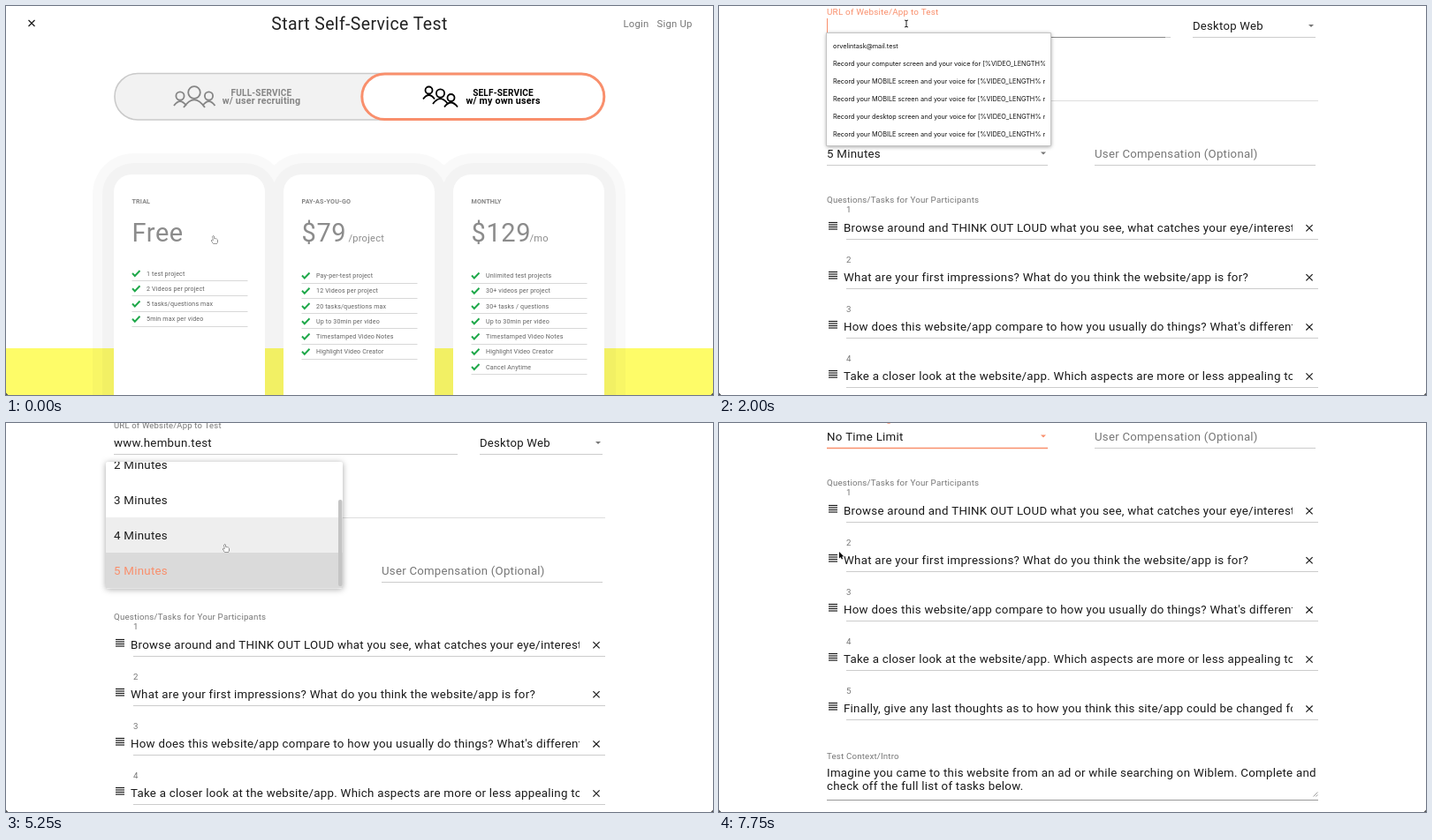
Recreate the animation shown at these times as an HTML page with a canvas. Size 800x441 px, loop 8 s.

```html
<!DOCTYPE html>
<html lang="en">
<head>
<meta charset="utf-8">
<title>Self-service test setup</title>
<style>
html, body { margin: 0; width: 100%; height: 100%; overflow: hidden; background: #fff; }
canvas { display: block; width: 800px; height: 441px; }
</style>
</head>
<body>
<canvas id="stage" width="800" height="441"></canvas>
<script>
const ctx = document.getElementById('stage').getContext('2d');
const STEP = 250, STEPS = 32;
const INK = '#1a1a1a', GREY = '#767676', LINE = '#cccccc', ORANGE = '#f98f6c';
const URL_TEXT = 'www.hembun.test', NAME_TEXT = 'my first website test';

const TASKS = [
  'Browse around and THINK OUT LOUD what you see, what catches your eye/interest and why.',
  'What are your first impressions? What do you think the website/app is for?',
  "How does this website/app compare to how you usually do things? What's different, better or worse?",
  'Take a closer look at the website/app. Which aspects are more or less appealing to you?',
  'Finally, give any last thoughts as to how you think this site/app could be changed for the better.'
];
const PLANS = [
  { name: 'TRIAL', price: 'Free', unit: '', top: 303,
    items: ['1 test project', '2 Videos per project', '5 tasks/questions max', '5min max per video'] },
  { name: 'PAY-AS-YOU-GO', price: '$79', unit: '/project', top: 305.5,
    items: ['Pay-per-test project', '12 Videos per project', '20 tasks/questions max',
      'Up to 30min per video', 'Timestamped Video Notes', 'Highlight Video Creator'] },
  { name: 'MONTHLY', price: '$129', unit: '/mo', top: 305.5,
    items: ['Unlimited test projects', '30+ videos per project', '30+ tasks / questions',
      'Up to 30min per video', 'Timestamped Video Notes', 'Highlight Video Creator', 'Cancel Anytime'] }
];
const LENGTHS = ['No Time Limit', '2 Minutes', '3 Minutes', '4 Minutes', '5 Minutes'];

// Pointer path: step, x, y, kind; positions are interpolated, kinds hold.
const POINTER = [
  [0, 236, 265, 'hand'], [2, 235, 261, 'arrow'], [5, 235, 261, 'arrow'], [7, 212, 20, 'beam'],
  [10, 212, 20, 'none'], [20, 248, 165, 'hand'], [21, 249, 142, 'hand'], [22, 249, 142, 'hand'],
  [24, 235, 68, 'hand'], [25, 235, 68, 'hand'], [26, 268, 150, 'arrow'], [27, 283, 211, 'arrow'],
  [28, 283, 211, 'arrow'], [30, 150, 160, 'arrow'], [31, 136, 146, 'arrow']
];

const clamp = (v, lo, hi) => Math.min(hi, Math.max(lo, v));

// y is the middle of the capitals
function text(str, x, y, size, color = INK, { weight = 400, align = 'left', font = 'Roboto', track = 0.02 } = {}) {
  ctx.font = `${weight} ${size}px ${font}, sans-serif`;
  ctx.letterSpacing = `${size * track}px`;
  ctx.textAlign = align;
  ctx.fillStyle = color;
  ctx.fillText(str, x, y + size * 0.355);
}

function stroke(color, width, trace) {
  ctx.beginPath();
  trace();
  ctx.strokeStyle = color;
  ctx.lineWidth = width;
  ctx.stroke();
}

function poly(points, close) {
  points.forEach(([x, y], i) => i ? ctx.lineTo(x, y) : ctx.moveTo(x, y));
  if (close) ctx.closePath();
}

const rule = (x1, x2, y, color = LINE, width = 1) =>
  stroke(color, width, () => poly([[x1, y], [x2, y]]));

function box(x, y, w, h, color) {
  ctx.fillStyle = color;
  ctx.fillRect(x, y, w, h);
}

function pill(x, y, w, h, r, fill, line, width) {
  ctx.beginPath();
  ctx.roundRect(x, y, w, h, r);
  ctx.fillStyle = fill;
  ctx.fill();
  if (line) {
    ctx.strokeStyle = line;
    ctx.lineWidth = width;
    ctx.stroke();
  }
}

function cross(x, y, r) {
  stroke(INK, 1.2, () => {
    poly([[x - r, y - r], [x + r, y + r]]);
    poly([[x + r, y - r], [x - r, y + r]]);
  });
}

function caretDown(x, y, color = GREY) {
  ctx.beginPath();
  poly([[x - 3, y - 1.5], [x + 3, y - 1.5], [x, y + 1.5]], true);
  ctx.fillStyle = color;
  ctx.fill();
}

function clipped(x, y, w, h, draw) {
  ctx.save();
  ctx.beginPath();
  ctx.rect(x, y, w, h);
  ctx.clip();
  draw();
  ctx.restore();
}

function person(x, y, r, shoulder, drop, color) {
  stroke(color, 1.8, () => {
    ctx.arc(x, y, r, 0, Math.PI * 2);
    ctx.moveTo(x - shoulder, y + drop);
    ctx.quadraticCurveTo(x, y + r - 1 + (r + 4 - drop), x + shoulder, y + drop);
  });
}

function drawToggle() {
  pill(123, 76.5, 554, 52.5, 26, '#f2f2f2', '#cacaca', 1.6);
  pill(402.8, 77, 274, 51.5, 25.7, '#fff', ORANGE, 3);
  person(213, 98, 6.8, 12, 17, '#858585');
  person(197, 102, 4.6, 7, 11, '#858585');
  person(229.5, 102, 4.6, 7, 11, '#858585');
  person(478.5, 95.5, 4, 6.5, 10, '#000');
  person(491.5, 99, 4.6, 8.5, 12, '#000');
  person(503.5, 104, 4, 7.5, 10.5, '#000');
  const bold = { weight: 700, align: 'center' };
  text('FULL-SERVICE', 289, 98, 10, '#858585', bold);
  text('w/ user recruiting', 289, 107.5, 10.7, '#858585', bold);
  text('SELF-SERVICE', 562.5, 98, 10, '#000', bold);
  text('w/ my own users', 562.5, 107.5, 10.7, '#000', bold);
}

function drawPlan(plan, i) {
  const x = 122 + 192 * i, left = x + 20.5;
  pill(x, 191, 171, 300, 20, '#fff');
  text(plan.name, left, 221, 7.2, '#858585', { weight: 700 });
  text(plan.price, left, 257, 29, '#8c8c8c');
  if (plan.unit) text(plan.unit, left + [0, 53, 66][i], 263, 11.1, '#8c8c8c');
  plan.items.forEach((item, k) => {
    const y = plan.top + 17.25 * k;
    stroke('#1fa84a', 1.9, () => poly([[left + 0.5, y], [left + 3.3, y + 3], [left + 9, y - 3]]));
    text(item, left + 16.5, y, 7.1, '#626262');
    rule(left, left + 131, Math.round(y + 8) + 0.5, '#d8d8d8');
  });
}

function drawPricing() {
  box(0, 388, 800, 53, '#fefc68');
  for (const [spread, shade] of [[24, 'rgba(0,0,0,.022)'], [13, 'rgba(0,0,0,.025)']]) {
    ctx.beginPath();
    for (let i = 0; i < 3; i++) {
      ctx.roundRect(122 + 192 * i - spread, 191 - spread, 171 + 2 * spread, 340, 22 + spread);
    }
    ctx.fillStyle = shade;
    ctx.fill();
  }
  cross(29, 19.5, 3.5);
  text('Start Self-Service Test', 400, 20, 19.4, '#222', { align: 'center' });
  text('Login', 698.5, 20, 11.3, GREY);
  text('Sign Up', 736.5, 20, 11.3, GREY);
  drawToggle();
  PLANS.forEach(drawPlan);
}

function drawTask(task, i) {
  const y = 251 + 56.1 * i;
  for (let k = 0; k < 4; k++) rule(124, 134, Math.round(y) - 5.5 + 2.5 * k, INK, 1.2);
  text(String(i + 1), 144, y - 20, 9.7, GREY);
  clipped(141, y - 12, 508, 24, () => text(task, 141, y, 13.3));
  cross(668, y + 0.7, 3.6);
  rule(144, 678, Math.round(y) + 13.5);
}

function drawUrlField(n) {
  const focused = n >= 8 && n < 17;
  rule(122, 511, 35.5);
  if (n < 8) {
    text('URL of Website/App to Test', 122, 22, 12.7, GREY);
    return;
  }
  const settling = n === 8;
  text('URL of Website/App to Test', 122, settling ? 6 : 3, settling ? 9.9 : 9.5, focused ? ORANGE : GREY);
  if (focused) rule(settling ? 128 : 122, settling ? 505 : 511, 35.5, '#888');
  const count = n <= 15 ? Math.round(1.4 * (n - 10)) : 7 + 4 * (n - 15);
  text(URL_TEXT.slice(0, clamp(count, 0, URL_TEXT.length)), 122, 22, 13.3);
  if (n <= 10) box(122, 14, 1, 16, ORANGE);
}

function drawNameField(n) {
  const focused = n >= 17 && n < 20;
  rule(122, 678, 107.5, focused ? '#888' : '#dedede');
  if (n < 17) {
    text('Name of Test', 122, 94.5, 12.7, GREY);
    return;
  }
  text('Name of Test', 122, 75.5, 9.6, focused ? ORANGE : GREY);
  text(NAME_TEXT.slice(0, 2 + 10 * (n - 17)), 122, 94.5, 13.3);
}

function drawForm(n) {
  drawUrlField(n);
  text('Desktop Web', 536, 22, 13.1);
  caretDown(670, 22.5);
  rule(536, 675, 35.5);

  drawNameField(n);

  const active = n >= 20;
  text('User Video Length', 122, 148, 9.7, active ? ORANGE : GREY);
  text(LENGTHS[n >= 25 ? 0 : 4], 122, 167, 13.3);
  caretDown(367, 167, active ? ORANGE : GREY);
  rule(122, 372, 180.5, active ? ORANGE : LINE, active ? 1.4 : 1);
  text('User Compensation (Optional)', 425, 167, 13.2, GREY);
  rule(425, 675, 180.5);

  text('Questions/Tasks for Your Participants', 122, 220, 9.75, GREY);
  TASKS.forEach(drawTask);

  text('Test Context/Intro', 122, 529.5, 9.7, GREY);
  text('Imagine you came to this website from an ad or while searching on Wiblem. Complete and', 122, 548.5, 13.3);
  text('check off the full list of tasks below.', 122, 563.5, 13.3);
  rule(122, 678, 579.5, '#999');
  stroke('#888', 0.8, () => {
    poly([[672.5, 575.5], [677.5, 570.5]]);
    poly([[675.5, 575.5], [677.5, 573.5]]);
  });
}

function panel(x, y, w, h, blur) {
  ctx.save();
  ctx.shadowColor = 'rgba(0,0,0,.35)';
  ctx.shadowBlur = blur;
  ctx.shadowOffsetY = 1;
  pill(x, y, w, h, 2, '#fff');
  ctx.restore();
}

function drawSuggestions() {
  panel(121.5, 30, 254.5, 129, 4);
  stroke('#c4c4c4', 1, () => ctx.rect(121.5, 30.5, 254, 128));
  const record = kind => `Record your ${kind} screen and your voice for [%VIDEO_LENGTH% minutes]`;
  const rows = ['orvelintask@mail.test',
    ...['computer', 'MOBILE', 'MOBILE', 'desktop', 'MOBILE'].map(record)];
  clipped(122, 31, 247, 127, () => rows.forEach((row, i) =>
    text(row, 129, 45 + 20 * i, 7.3, '#111', { font: 'Inter', track: 0 })));
}

function drawLengthMenu(n) {
  const scroll = clamp((n - 21) * 20, 0, 60);
  const hover = n < 21 ? 4 : n < 23 ? 3 : n < 24 ? 1 : 0;
  panel(113, 44, 268, 143.5, 7);
  clipped(113, 44, 268, 143.5, () => {
    LENGTHS.forEach((label, i) => {
      const y = 7 + 40 * i + scroll, selected = i === 4;
      if (selected || i === hover) box(113, y - 20, 268, 40, selected ? '#dadada' : '#eeeeee');
      text(label, 122, y + 0.3, 13.3, selected ? ORANGE : INK);
    });
    pill(376, 87 - scroll * 0.7, 4.5, 98, 2, '#c4c4c4');
  });
}

function drawPointer(n) {
  const i = POINTER.findLastIndex(key => key[0] <= n);
  const [start, x0, y0, kind] = POINTER[i];
  const [end, x1, y1] = POINTER[i + 1] || [start + 1, x0, y0];
  if (kind === 'none') return;
  const p = (n - start) / (end - start);
  // The kind changes in place, without drifting toward the next one.
  const hold = kind === 'hand' && end === 2 ? 0 : p;
  ctx.save();
  ctx.translate(x0 + (x1 - x0) * hold, y0 + (y1 - y0) * hold);
  ctx.lineJoin = 'round';
  if (kind === 'beam') {
    stroke('#222', 1, () => {
      poly([[-2, -4], [0, -3.3], [2, -4]]);
      poly([[0, -3.3], [0, 3.3]]);
      poly([[-2, 4], [0, 3.3], [2, 4]]);
    });
  } else {
    ctx.beginPath();
    if (kind === 'arrow') {
      poly([[0, 0], [0, 7.4], [1.7, 5.9], [2.9, 8.5], [4.1, 8], [3, 5.4], [5.2, 5.3]], true);
    } else {
      poly([[-2, -4], [-0.8, -4], [-0.3, -1], [2.5, -0.7], [3.5, 0.2], [3, 3],
        [2.3, 4.5], [-1.2, 4.5], [-3.6, 1], [-2.8, 0.2], [-1.5, 1]], true);
    }
    ctx.fillStyle = kind === 'arrow' ? '#000' : '#fff';
    ctx.strokeStyle = kind === 'arrow' ? '#fff' : '#222';
    ctx.lineWidth = 0.9;
    ctx.stroke();
    ctx.fill();
  }
  ctx.restore();
}

function drawCorners() {
  ctx.fillStyle = '#555';
  ctx.beginPath();
  poly([[0, 438.5], [2.5, 441], [0, 441]], true);
  poly([[800, 438.5], [797.5, 441], [800, 441]], true);
  ctx.fill();
}

function draw(n) {
  box(0, 0, 800, 441, '#fff');
  if (n < 2) {
    drawPricing();
  } else {
    const scroll = n < 28 ? 0 : n === 28 ? 60 : 152;
    ctx.save();
    ctx.translate(0, -scroll);
    drawForm(n);
    ctx.restore();
    if (n === 8 || n === 9) drawSuggestions();
    if (n >= 20 && n < 26) drawLengthMenu(n);
    if (n < 6 || (n >= 28 && n < 31)) pill(795, 164 + scroll * 0.32, 4, 141, 2, '#7d7d7d');
  }
  drawPointer(n);
  drawCorners();
}

function tick(now) {
  draw(Math.floor(now / STEP) % STEPS);
  requestAnimationFrame(tick);
}
draw(0);
requestAnimationFrame(tick);
</script>
</body>
</html>
```
